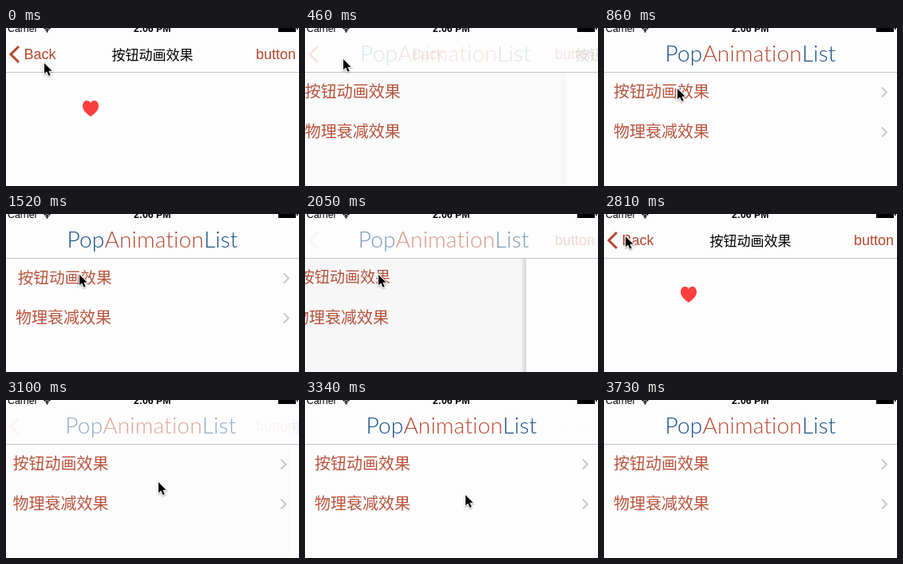
Recreate the animation shown at these times as an HTML page with a canvas. Size 367x198 px, loop 4240 ms.

```html
<!DOCTYPE html>
<html lang="zh">
<head>
<meta charset="utf-8">
<style>
  html, body { margin: 0; width: 100%; height: 100%; overflow: hidden; background: #fdfdfd; }
  canvas { display: block; width: 367px; height: 198px; }
</style>
</head>
<body>
<canvas id="stage"></canvas>
<script>
const W = 367, H = 198, LOOP = 4240;
const RED = '#b5472f', ROW_RED = '#b9533d', BLUE = '#164e87', PAPER = '#fdfdfd';
const LATIN = '"Liberation Sans", Arial, sans-serif';
const CJK = '"Noto Sans CJK SC", "Noto Sans CJK", sans-serif';
const CJK_LIGHT = '"Noto Sans CJK SC Light", ' + CJK;
const TITLE = '按钮动画效果';

const canvas = document.getElementById('stage');
const ctx = canvas.getContext('2d');
const ratio = window.devicePixelRatio || 1;
canvas.width = W * ratio;
canvas.height = H * ratio;

// Bursts of screen updates: first, last, count.
const BURSTS = [
  [0, 0, 1], [60, 60, 1], [290, 810, 10], [860, 860, 1], [1520, 1640, 3],
  [2050, 2520, 9], [2580, 2630, 2], [2810, 3280, 9], [3340, 3730, 8]
];

// Pointer tip: time, x, y.
const POINTER = [
  [0, 48, 44], [59, 48, 44], [60, 48, 39], [470, 48, 39], [810, 91, 74],
  [860, 92, 76], [2300, 92, 76], [2520, 38, 34], [2580, 31, 30], [2630, 27, 28],
  [2810, 27, 28], [3100, 191, 103], [3280, 192, 107], [3340, 201, 119], [3730, 301, 203]
];

const HEART = new Path2D('M0 10C-4 7-10 3-10-3.5C-10-7.5-7.5-10-4.8-10C-2.5-10-.8-8.8 0-7C.8-8.8 2.5-10 4.8-10C7.5-10 10-7.5 10-3.5C10 3 4 7 0 10Z');
const ARROW = new Path2D('M0 0V13.3L3.1 10.5L5.5 15.8L7.7 14.8L5.4 9.7H9.6Z');

const clamp = v => Math.max(0, Math.min(1, v));
const spring = s => (1 + .01895 * s) * Math.exp(-.01895 * s);

function snap(t) {
  const [first, last, count] = BURSTS.filter(b => b[0] <= t).pop();
  if (count === 1) return first;
  const gap = (last - first) / (count - 1);
  return first + gap * Math.min(count - 1, Math.floor((t - first + 6) / gap));
}

function pointerAt(t) {
  const i = POINTER.findIndex(p => p[0] > t);
  if (i < 0) return POINTER[POINTER.length - 1].slice(1);
  const [t0, x0, y0] = POINTER[i - 1], [t1, x1, y1] = POINTER[i];
  const k = (t - t0) / (t1 - t0);
  return [x0 + (x1 - x0) * k, y0 + (y1 - y0) * k];
}

// "detail" is how much of the detail page is on screen, 0 to 1.
function navigation(t) {
  if (t >= 2000 && t < 2800) {
    const s = t - 2000;
    return {
      detail: 1 - spring(s), drift: 40, shade: .8, list: Math.exp(-s / 88),
      back: clamp((s - 30) / 480), title: clamp((s - 50) / 200), button: clamp(s / 250)
    };
  }
  const s = Math.max(0, t - (t < 2000 ? 265 : 2826));
  const fade = s > 550 ? 0 : Math.exp(-s / 95);
  return {
    detail: spring(s), drift: 66, shade: .2, list: clamp((s - 165) / 235),
    back: fade, title: fade, button: fade
  };
}

function text(str, x, y, font, color, alpha = 1) {
  ctx.globalAlpha = alpha;
  ctx.font = font;
  ctx.fillStyle = color;
  ctx.fillText(str, x, y);
  ctx.globalAlpha = 1;
}

function chevron(x, y, dx, dy, width, color, alpha = 1) {
  ctx.globalAlpha = alpha;
  ctx.strokeStyle = color;
  ctx.lineWidth = width;
  ctx.beginPath();
  ctx.moveTo(x - dx, y - dy);
  ctx.lineTo(x, y);
  ctx.lineTo(x - dx, y + dy);
  ctx.stroke();
  ctx.globalAlpha = 1;
}

function row(label, y, scale) {
  const pivot = 171;
  ctx.save();
  ctx.translate(pivot, y);
  ctx.scale(scale, scale);
  text(label, 12 - pivot, 7.3, '300 20px ' + CJK_LIGHT, ROW_RED);
  ctx.restore();
  chevron(354, y + 1, 6, 6, 2, '#c7c7cc');
}

function listPage(detail, scale) {
  ctx.save();
  ctx.translate(-.3 * W * detail, 0);
  row(TITLE, 79.5, scale);
  row('物理衰减效果', 129.5, 1);
  ctx.restore();
  ctx.fillStyle = `rgba(0,0,0,${.09 * detail})`;
  ctx.fillRect(0, 56, W, H);
}

function detailPage({ detail, shade }) {
  const edge = W * (1 - detail);
  const shadow = ctx.createLinearGradient(edge - 7, 0, edge, 0);
  shadow.addColorStop(0, 'rgba(0,0,0,0)');
  shadow.addColorStop(1, `rgba(0,0,0,${shade * detail * (1 - detail)})`);
  ctx.fillStyle = shadow;
  ctx.fillRect(edge - 7, 56, 7, H);
  ctx.fillStyle = PAPER;
  ctx.fillRect(edge, 56, W, H);
  ctx.save();
  ctx.translate(106 + edge * 1.4, 101);
  ctx.fillStyle = '#fa3e3e';
  ctx.fill(HEART);
  ctx.restore();
}

function listTitle(nav) {
  const font = '300 28px Lato, sans-serif';
  const parts = [['Pop', BLUE], ['Animation', RED], ['List', BLUE]];
  ctx.save();
  ctx.font = font;
  ctx.letterSpacing = '0.2px'; // also keeps "ti" from joining
  const widths = parts.map(p => ctx.measureText(p[0]).width);
  let x = W / 2 - widths.reduce((a, b) => a + b) / 2 - nav.drift * nav.detail;
  parts.forEach(([str, color], i) => {
    text(str, x, 42, font, color, nav.list);
    x += widths[i];
  });
  ctx.restore();
}

function navBar(nav) {
  const away = 1 - nav.detail;
  ctx.fillStyle = PAPER;
  ctx.fillRect(0, 0, W, 55);
  ctx.fillStyle = '#c4c4c4';
  ctx.fillRect(0, 55, W, 1);
  listTitle(nav);
  chevron(6, 33, -10, 10, 3, RED, nav.back);
  text('Back', 22.5 + 125 * away, 39, '18px ' + LATIN, RED, nav.back);
  text(TITLE, 132.5 + 232 * away, 39.5, '500 17px ' + CJK, '#000', nav.title);
  text('button', 313, 39, '18px ' + LATIN, RED, nav.button);
}

function statusBar() {
  text('Carrier', 2, 5, '12.3px ' + LATIN, '#000');
  text('2:06 PM', 160, 5, 'bold 12.3px ' + LATIN, '#000');
  ctx.strokeStyle = '#000';
  ctx.lineWidth = 1.6;
  for (const r of [2.8, 5.4]) {
    ctx.beginPath();
    ctx.arc(51.5, 5, r, -2.35, -.8);
    ctx.stroke();
  }
  ctx.fillStyle = '#000';
  ctx.fillRect(50.5, 3.5, 2, 2);
  ctx.fillRect(341, 0, 22, 5);
  ctx.fillRect(364, 0, 1.5, 2);
}

function pointer(t) {
  ctx.save();
  ctx.translate(...pointerAt(t));
  ctx.shadowColor = 'rgba(0,0,0,.35)';
  ctx.shadowBlur = 2 * ratio;
  ctx.shadowOffsetY = ratio;
  ctx.strokeStyle = '#fff';
  ctx.lineWidth = 2;
  ctx.stroke(ARROW);
  ctx.shadowColor = 'transparent';
  ctx.fillStyle = '#000';
  ctx.fill(ARROW);
  ctx.restore();
}

function draw(now) {
  const t = snap(now % LOOP);
  const nav = navigation(t);
  const press = t < 2500 ? clamp((t - 1460) / 180) : 0;
  ctx.setTransform(ratio, 0, 0, ratio, 0, 0);
  ctx.fillStyle = PAPER;
  ctx.fillRect(0, 0, W, H);
  listPage(nav.detail, 1 - .05 * press);
  detailPage(nav);
  navBar(nav);
  statusBar();
  pointer(t);
}

const start = performance.now();
function tick() {
  draw(performance.now() - start);
  requestAnimationFrame(tick);
}
tick();
</script>
</body>
</html>
```
